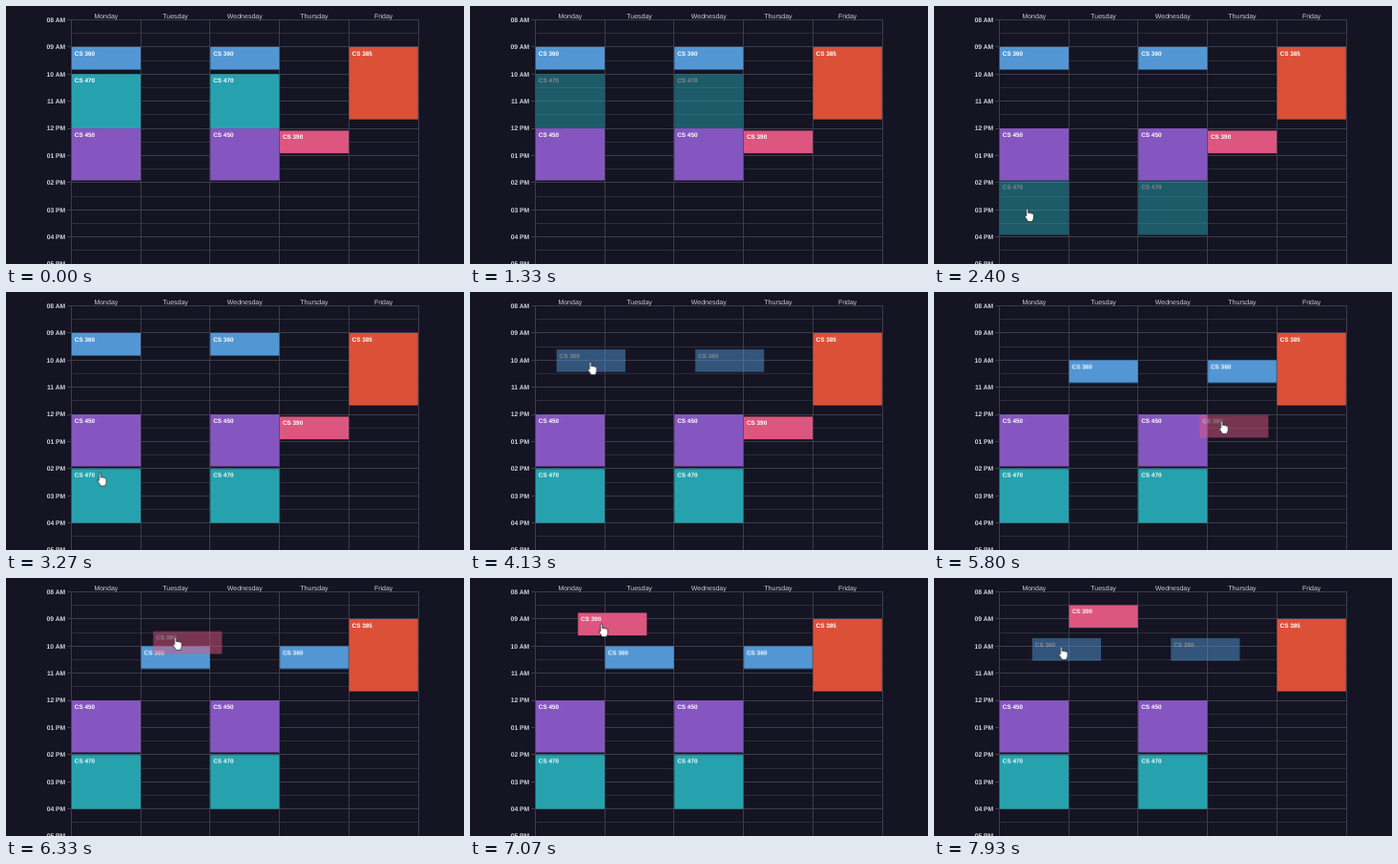
Write an HTML page that moves like this. It is 480x270 px and loops after 8000 ms.

```html
<!DOCTYPE html>
<html lang="en">
<head>
<meta charset="utf-8">
<title>Course schedule</title>
<style>
html, body { margin: 0; width: 100%; height: 100%; overflow: hidden; background: #141422; }
svg { display: block; width: 480px; height: 270px; font-family: "Liberation Sans", Arial, sans-serif; text-rendering: geometricPrecision; }
.grid { stroke: #3c3c4c; stroke-width: 1; }
.half { stroke: #2d2d3b; }
.day { fill: #d2d2da; font-size: 7px; text-anchor: middle; }
.hour { fill: #d2d2da; font-size: 6.8px; font-weight: bold; text-anchor: end; }
.course text { fill: #fff; font-size: 6.4px; font-weight: bold; }
.course, #hand { animation: 8s linear infinite; }
.fade { animation: 8s step-end infinite; }
#c360 { animation-name: move360; }
#c470 { animation-name: move470; }
#c390 { animation-name: move390; }
#c360 .fade { animation-name: fade360; }
#c470 .fade { animation-name: fade470; }
#c390 .fade { animation-name: fade390; }
#hand { animation-name: point; }
#hand .fade { animation-name: show; }

@keyframes fade470 { 0% { opacity: 1 } 16.5% { opacity: .5 } 38.3% { opacity: 1 } 100% { opacity: 1 } }
@keyframes fade360 { 0% { opacity: 1 } 49% { opacity: .5 } 59.9% { opacity: 1 } 94.5% { opacity: .5 } 100% { opacity: .5 } }
@keyframes fade390 { 0% { opacity: 1 } 71.3% { opacity: .5 } 86.5% { opacity: 1 } 100% { opacity: 1 } }
@keyframes show { 0% { opacity: 0 } 17.2% { opacity: 1 } 100% { opacity: 1 } }

@keyframes move470 {
  0%, 17.3% { transform: translate(0, 0) }
  19% { transform: translate(0, 10px) }
  23% { transform: translate(0, 62px) }
  26.6% { transform: translate(0, 95px) }
  30% { transform: translate(0, 111.5px) }
  33% { transform: translate(0, 125px) }
  36.6%, 39.1% { transform: translate(0, 119px) }
  39.11%, 100% { transform: translate(0, 113.6px) }
}
@keyframes move360 {
  0%, 49.3% { transform: translate(0, 0) }
  51.6% { transform: translate(21.5px, 17px) }
  55% { transform: translate(54px, 26px) }
  59.1%, 60.8% { transform: translate(69px, 30px) }
  60.81%, 95% { transform: translate(72.7px, 28.4px) }
  96.6% { transform: translate(60.5px, 26px) }
  99.1% { transform: translate(34.4px, 20.1px) }
  100% { transform: translate(26px, 18px) }
}
@keyframes move390 {
  0%, 71.6% { transform: translate(0, 0) }
  72.5% { transform: translate(-8.4px, -1.6px) }
  76.2% { transform: translate(-78px, -38px) }
  78.8% { transform: translate(-128px, -72px) }
  80.9% { transform: translate(-157px, -88.5px) }
  81.6% { transform: translate(-165px, -91.5px) }
  82.5% { transform: translate(-171px, -93.5px) }
  83.4%, 89.1% { transform: translate(-173.8px, -94px) }
  89.11%, 100% { transform: translate(-145.4px, -102.1px) }
}
@keyframes point {
  0%, 17.3% { transform: translate(100px, 107.5px) }
  19% { transform: translate(100px, 117.5px) }
  23% { transform: translate(100px, 169.5px) }
  26.6% { transform: translate(100px, 202.5px) }
  30% { transform: translate(100px, 219px) }
  33% { transform: translate(100px, 232.5px) }
  36.6%, 39.5% { transform: translate(100px, 226.5px) }
  43.5% { transform: translate(102px, 140px) }
  46.5% { transform: translate(105px, 78px) }
  48.3%, 49.3% { transform: translate(106.5px, 63px) }
  51.6% { transform: translate(128px, 80px) }
  55% { transform: translate(160.5px, 89px) }
  59.1%, 61% { transform: translate(175.5px, 93px) }
  65% { transform: translate(245px, 118px) }
  70%, 71.6% { transform: translate(312.4px, 143.6px) }
  72.5% { transform: translate(304px, 142px) }
  76.2% { transform: translate(234.4px, 105.6px) }
  78.8% { transform: translate(184.4px, 71.6px) }
  80.9% { transform: translate(155.4px, 55.1px) }
  81.6% { transform: translate(147.4px, 52.1px) }
  82.5% { transform: translate(141.4px, 50.1px) }
  83.4%, 86.6% { transform: translate(138.6px, 49.6px) }
  88.4% { transform: translate(140px, 55px) }
  93.8%, 95% { transform: translate(174.3px, 87.3px) }
  96.6% { transform: translate(162.1px, 84.9px) }
  99.1% { transform: translate(136px, 79px) }
  100% { transform: translate(127.6px, 76.9px) }
}
</style>
</head>
<body>
<svg width="480" height="270" viewBox="0 0 480 270">
  <g id="table"></g>
  <g id="courses"></g>
  <g id="hand"><g class="fade">
    <path d="M-3.2-6C-3.2-7.4-1.2-7.4-1.2-6V-2.2C-.9-3.2 .7-3 .8-2C1.2-2.8 2.5-2.5 2.6-1.5C3.2-2.2 4.4-1.8 4.4-.7V2.4C4.4 4.1 3.3 4.6 3.3 6.6H-1.7C-1.9 4.8-4.5 2.7-4.9 .8C-5-.3-3.9-.2-3.2 .9Z" fill="#fff" stroke="#14141c" stroke-width=".7" stroke-linejoin="round"/>
  </g></g>
</svg>
<script>
const LEFT = 68.5, TOP = 14.5, COL = 72.7, HOUR = 28.4;
const days = ["Monday", "Tuesday", "Wednesday", "Thursday", "Friday"];

// number, colour, day columns, start hour, length in hours
const courses = [
  [360, "#5297d4", [0, 2], 9, 5 / 6],
  [470, "#26a2ae", [0, 2], 10, 2],
  [450, "#8656c0", [0, 2], 12, 23 / 12],
  [390, "#dc567f", [3], 12 + 1 / 12, 5 / 6],
  [385, "#dc5037", [4], 9, 8 / 3]
];

const colX = i => LEFT + COL * i;
const hourY = h => TOP + HOUR * (h - 8);
const text = (x, y, cls, s) => `<text x="${x}" y="${y}" class="${cls}">${s}</text>`;
const line = (x1, y1, x2, y2, cls) =>
  `<line x1="${x1}" y1="${y1}" x2="${x2}" y2="${y2}" class="${cls}"/>`;
const snap = v => Math.floor(v) + .5;

let table = "";
for (let h = 8; h <= 17; h++) {
  const y = snap(hourY(h)), mid = snap(hourY(h + .5));
  const label = String((h + 11) % 12 + 1).padStart(2, "0") + (h < 12 ? " AM" : " PM");
  table += line(LEFT, mid, 433, mid, "grid half") + line(64, y, 433, y, "grid");
  table += text(62.3, hourY(h) + 2.3, "hour", label);
}
for (let i = 0; i <= 5; i++) table += line(snap(colX(i)), TOP, snap(colX(i)), 270, "grid");
days.forEach((d, i) => table += text(colX(i + .5), 12.6, "day", d));
document.getElementById("table").innerHTML = table;

const block = (n, color, col, start, len) => {
  const x = colX(col) + .3, y = hourY(start);
  return `<rect x="${x}" y="${y}" width="72.2" height="${len * HOUR}" fill="${color}"/>` +
    text(x + 3, y + 8.7, "", "CS " + n);
};
document.getElementById("courses").innerHTML = courses.map(([n, color, cols, start, len]) =>
  `<g id="c${n}" class="course"><g class="fade">` +
  cols.map(c => block(n, color, c, start, len)).join("") + "</g></g>").join("");
</script>
</body>
</html>
```
